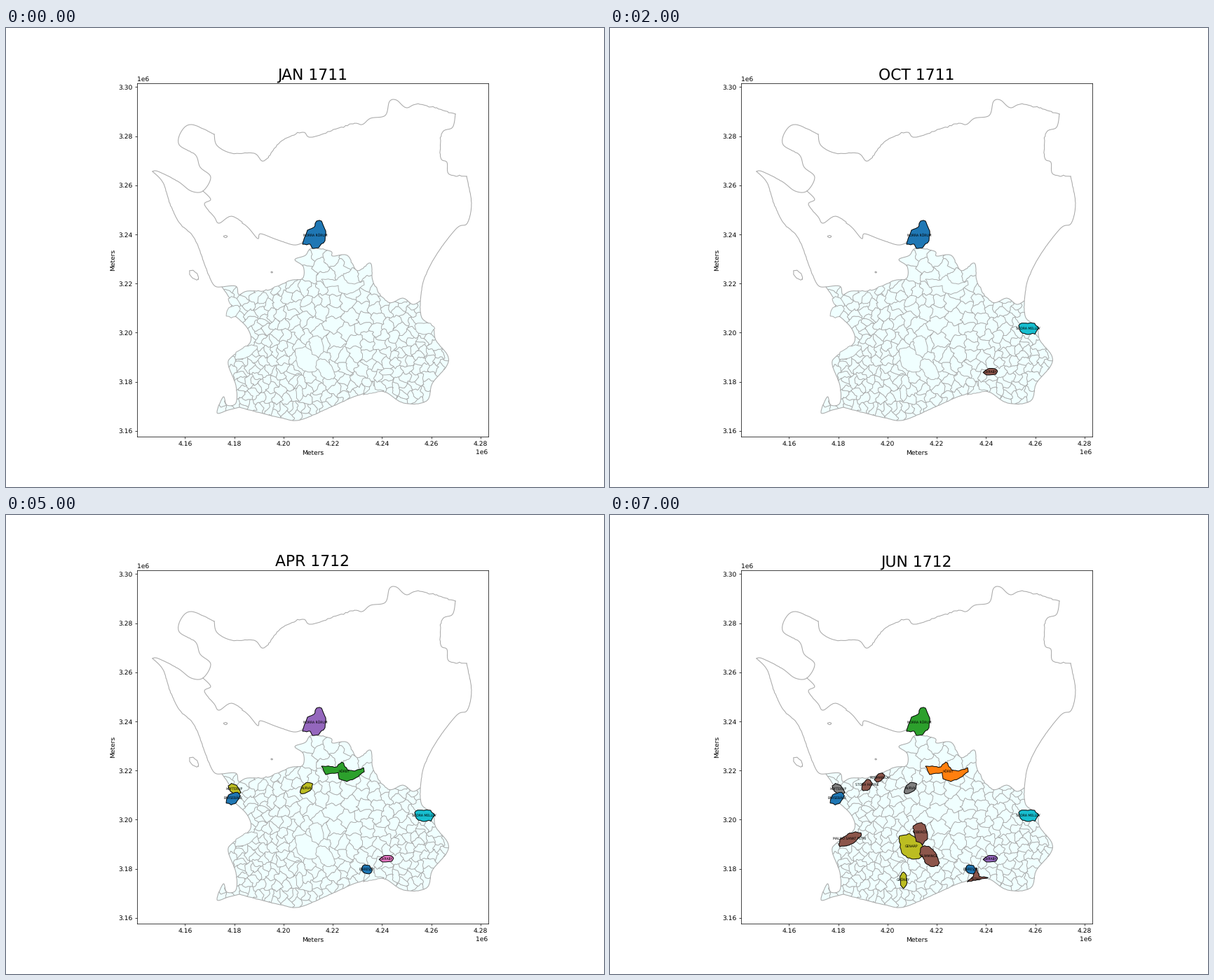
These frames come from a looping animation (853x656 px, 8 s). A matplotlib script:

```python
import numpy as np
import matplotlib.pyplot as plt
from matplotlib.animation import FuncAnimation
from matplotlib.collections import PolyCollection
from matplotlib.patches import Polygon
from matplotlib.path import Path

plt.rcParams["text.hinting"] = "none"
W, H, DPI = 853, 656, 65.6
SCALE = 0.003511  # pixels per metre
GREY, AZURE = "darkgrey", "azure"
MONTHS = ["JAN 1711", "JUN 1711", "OCT 1711", "DEC 1711",
          "MAR 1712", "APR 1712", "MAY 1712", "JUN 1712"]
rng = np.random.default_rng(17)


def geo(pts):
    """Stage pixels to map metres."""
    x, y = np.asarray(pts, float).T
    return np.column_stack([4.16e6 + (x - 255.4) / SCALE,
                            3.30e6 - (y - 84.4) / SCALE])


def rough(pts, amp, step=3):
    """Subdivide a line and shake the inner points."""
    pts = np.asarray(pts, float)
    out = [pts[:1]]
    for a, b in zip(pts[:-1], pts[1:]):
        n = max(1, round(np.hypot(*(b - a)) / step))
        seg = a + (b - a) * np.arange(1, n + 1)[:, None] / n
        seg[:-1] += rng.normal(0, amp, (n - 1, 2))
        out.append(seg)
    return np.vstack(out)


def curve(pts, amp):
    """Catmull-Rom spline through key points, with a shaken line."""
    p = np.array([pts[0], *pts, pts[-1]], float)
    t = np.linspace(0, 1, 6, endpoint=False)[:, None]
    parts = [b + (c - a) * t / 2 + (2 * a - 5 * b + 4 * c - d) * t**2 / 2
             + (3 * b - a - 3 * c + d) * t**3 / 2
             for a, b, c, d in zip(p, p[1:], p[2:], p[3:])]
    return rough(np.vstack(parts + [p[-1:]]), amp)


def blob(rx, ry, tilt=0):
    """Uneven ellipse around the origin."""
    a = np.linspace(0, 2 * np.pi, 14, endpoint=False)
    r = rng.uniform(0.86, 1.14, a.size)
    x, y = rx * r * np.cos(a), ry * r * np.sin(a)
    c, s = np.cos(np.radians(tilt)), np.sin(np.radians(tilt))
    return [*zip(c * x - s * y, s * x + c * y)]


# Coast and border key points
NW, NE, E, SW, W_END = (209, 205), (657, 212), (591, 390), (333, 542), (308, 370)
cape = (281, 233)
west = curve([NW, (224, 221), (234, 251), (247, 278), (269, 301), (287, 348),
              (297, 368), W_END], 0.2)
northwest = curve([NW, (217, 205), (245, 219), (264, 233), (281, 233), (292, 213),
                   (277, 199), (270, 181), (247, 167), (250, 148), (265, 138),
                   (297, 152)], 0.2)
north = curve([(297, 152), (301, 168), (322, 179), (354, 179), (368, 190), (391, 163),
               (423, 149), (437, 156), (492, 137), (508, 138), (520, 129), (541, 125),
               (547, 105), (557, 103), (571, 114), (590, 109), (641, 123)], 0.6)
northeast = curve([(641, 123), (637, 142), (622, 150), (620, 185), (629, 192),
                   (632, 209), NE], 0.6)
east = curve([NE, (664, 250), (658, 279), (643, 286), (614, 324), (596, 360), E], 0.2)
inland = curve([cape, (292, 245), (283, 252), (297, 270), (304, 279), (322, 269),
                (344, 284), (359, 301), (363, 294), (385, 302), (410, 310),
                (423, 307)], 0.8)
border = curve([W_END, (328, 369), (332, 381), (344, 376), (373, 375), (405, 361),
                (423, 358), (424, 341), (412, 331), (427, 325), (436, 315), (463, 319),
                (466, 326), (487, 325), (501, 347), (520, 336), (524, 364), (545, 392),
                (566, 386), (580, 395), E], 0.6)
southeast = curve([E, (593, 414), (609, 427), (613, 446), (630, 468), (628, 484),
                   (608, 508), (600, 533), (567, 536), (537, 519), (502, 525),
                   (467, 540), (420, 560), (391, 557), SW], 0.2)
southwest = curve([SW, (317, 546), (301, 550), (310, 527), (315, 539), (328, 536),
                   (328, 511), (317, 481), (323, 469), (348, 450), (345, 430),
                   (327, 412), (315, 409), (322, 393), W_END], 0.2)
south = np.vstack([border, southeast, southwest])


def island(x, y, rx, ry, tilt=0):
    ring = np.array(blob(rx, ry, tilt)) + (x, y)
    return np.vstack([ring, ring[:1]])


lines = [west, northwest, north, northeast, east, inland,
         island(268, 353, 8, 4.5, 45), island(313, 298, 2.5, 1.5), island(379, 349, 1, 1)]

# Name, month of outbreak, centre, outline around the centre
PARISHES = [
    ("NORRA RÖRUM", "JAN 1711", (441, 297), [
        (-18, 12), (-11, -8), (-2, -12), (2, -21), (9, -21), (15, -7), (14, 7),
        (5, 17), (-4, 18), (-7, 12)]),
    ("ÖVRABY", "JUN 1711", (543, 491.3), blob(10, 5, -5)),
    ("SÖDRA MELLBY", "OCT 1711", (596.5, 429.5), blob(14, 9)),
    ("HÖRBY", "DEC 1711", (482, 367), [
        (-32, -8), (-10, -7), (-3, -14), (5, -3), (15, -1), (28, -6), (29, 0),
        (18, 8), (4, 14), (-7, 10), (-8, 1), (-26, 4)]),
    ("HOFTERUP", "MAR 1712", (326, 392), blob(10, 6, 45)),
    ("HURVA", "MAR 1712", (428.5, 390.3), blob(10, 6, -35)),
    ("BARSEBÄCK", "APR 1712", (324, 404.8), blob(11, 7, -35)),
    ("BJÄRESJÖ", "APR 1712", (514.5, 506.3), blob(8, 6, 20)),
    ("GENARP", "MAY 1712", (430.5, 474), blob(21, 15, 40)),
    ("GRÖNBY", "MAY 1712", (418.7, 522), blob(10.5, 5, 90)),
    ("REMMARLÖV", "JUN 1712", (384.5, 375.3), blob(8, 5, -40)),
    ("STORA HARRIE", "JUN 1712", (366.5, 386), blob(9, 6, -55)),
    ("MALMÖ SANKT PETRI", "JUN 1712", (341.5, 463), blob(18, 7, -28)),
    ("VEBERÖD", "JUN 1712", (443, 454), blob(16, 10, 80)),
    ("SLIMMINGE", "JUN 1712", (455.5, 487.5), blob(17, 10, 50)),
    ("YSTAD", "JUN 1712", (521.5, 520.3), [
        (-12, 4), (-3, -4), (1, -16), (5, -4), (18, -2), (3, 1)]),
]
outlines = [np.array(shape + shape[:1]) + spot for _, _, spot, shape in PARISHES]


# Small parishes: a warped Voronoi pattern
def spacing(x, y):
    middle = 8 * np.exp(-((x - 475) / 60) ** 2 - ((y - 435) / 65) ** 2)
    top = 9 * np.exp(-((y - 335) / 35) ** 2)
    return (9.5 + middle + top) * rng.uniform(0.75, 1.3)


def make_sites():
    land, taken = Path(south), [Path(o) for o in outlines]
    # narrow strips along the west and south coasts
    sites = [(334 + 3 * (k % 2), 470 + 6.5 * k) for k in range(9)]
    sites += [(355 + 3 * (k % 2), 473 + 8 * k) for k in range(6)]
    sites += [(352 + 8.5 * k, 541 + 3 * (k % 2)) for k in range(10)]
    for x, y in rng.uniform((305, 312), (632, 562), (5000, 2)):
        if not land.contains_point((x, y)) or any(t.contains_point((x, y)) for t in taken):
            continue
        if np.hypot(*(np.array(sites) - (x, y)).T).min() > spacing(x, y):
            sites.append((x, y))
    return np.array(sites)


def clip(poly, mid, normal):
    """Keep the part of poly behind the line through mid."""
    side = (poly - mid) @ normal
    out = []
    for k in range(len(poly)):
        a, b, sa, sb = poly[k - 1], poly[k], side[k - 1], side[k]
        if (sa <= 0) != (sb <= 0):
            out.append(a + (b - a) * sa / (sa - sb))
        if sb <= 0:
            out.append(b)
    return np.array(out)


def warp(p):
    x, y = p.T
    dx = 1.9 * np.sin(0.42 * y + 1.5 * np.sin(0.17 * x)) + 0.7 * np.sin(0.9 * y + 0.5 * x)
    dy = 1.9 * np.sin(0.39 * x + 1.5 * np.sin(0.19 * y)) + 0.7 * np.sin(0.8 * x - 0.6 * y)
    return np.column_stack([x + dx, y + dy])


def cell(site, sites):
    poly = site + 45 * np.array([(-1, -1), (1, -1), (1, 1), (-1, 1)])
    order = np.argsort(np.hypot(*(sites - site).T))[1:32]
    for other in sites[order]:
        poly = clip(poly, (site + other) / 2, other - site)
    return warp(rough(np.vstack([poly, poly[:1]]), 0, 2))


sites = make_sites()
cells = [geo(cell(s, sites)) for s in sites]

fig = plt.figure(figsize=((W + 1e-6) / DPI, (H + 1e-6) / DPI), dpi=DPI)
left, right, top, bottom = 187, 687.6, 78.7, 583.8
ax = fig.add_axes([left / W, 1 - bottom / H, (right - left) / W, (bottom - top) / H])
(x0, y0), (x1, y1) = geo([(left, bottom), (right, top)])
ax.set(xlim=(x0, x1), ylim=(y0, y1), xlabel="Meters", ylabel="Meters",
       xticks=4.16e6 + 2e4 * np.arange(7), yticks=3.16e6 + 2e4 * np.arange(8))
title = ax.set_title("", fontsize=24)

for line in lines:
    ax.plot(*geo(line).T, color=GREY, lw=1.15, zorder=1)

region = ax.add_patch(Polygon(geo(south), fc=AZURE, ec="none", zorder=2))
mesh = PolyCollection(cells, facecolors=AZURE, edgecolors=GREY, linewidths=0.9, zorder=3)
ax.add_collection(mesh, autolim=False)
mesh.set_clip_path(region)
ax.add_patch(Polygon(geo(south), fc="none", ec=GREY, lw=1.15, zorder=4))

shown = []
for (name, month, spot, _), outline in zip(PARISHES, outlines):
    shape = geo(rough(outline, 0.5))
    ax.add_patch(Polygon(shape, fc=AZURE, ec=GREY, lw=1, zorder=5))
    patch = ax.add_patch(Polygon(shape, ec="black", lw=1, zorder=6))
    label = ax.text(*geo([spot])[0], name, fontsize=5, ha="center", va="center", zorder=7)
    shown.append((month, patch, label))


def update(i):
    title.set_text(MONTHS[i])
    # months are coloured in alphabetical order over the whole colour map
    active = sorted(MONTHS[:i + 1])
    for month, patch, label in shown:
        on = month in active
        patch.set_visible(on)
        label.set_visible(on)
        if on:
            patch.set_facecolor(plt.cm.tab10(active.index(month) / max(i, 1)))
    return []


anim = FuncAnimation(fig, update, frames=len(MONTHS), interval=1000,
                     repeat=True, repeat_delay=0, blit=False)
plt.show()
```
